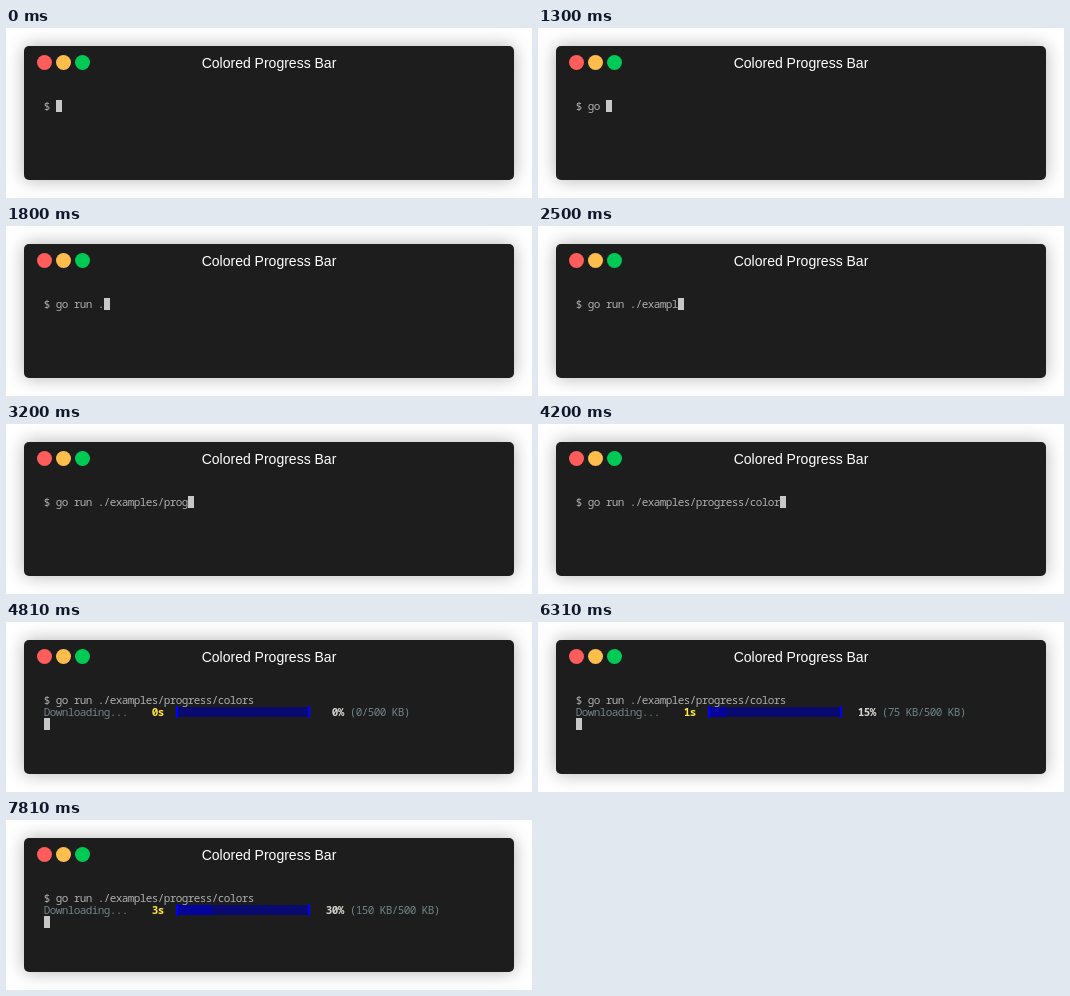
An HTML page for the animation above (8000 ms loop, 526 by 170 pixels).

```html
<!DOCTYPE html>
<html lang="en">
<head>
<meta charset="utf-8">
<title>Colored Progress Bar</title>
<style>
  html, body { margin: 0; width: 526px; height: 170px; overflow: hidden; background: #fff; }
  .window {
    position: absolute; left: 18px; top: 18px; width: 490px; height: 134px;
    border-radius: 5px; background: #1d1d1d; box-shadow: 0 0 18px rgba(0, 0, 0, .3);
  }
  .dot { position: absolute; top: 9px; width: 15px; height: 15px; border-radius: 50%; }
  .title {
    position: absolute; top: 9px; width: 100%; text-align: center; color: #fff;
    font: 14px/16px "Liberation Sans", Arial, sans-serif;
  }
  .screen {
    position: absolute; left: 20px; top: 54px; color: #afafaf;
    font: 11px/12px "Noto Sans Mono", monospace; letter-spacing: -.6px;
  }
  .screen > * { position: absolute; }
  .text { margin-left: -.3px; white-space: pre; }
  .cursor { width: 6px; height: 12px; background: #c7c7c7; }
  .row { top: 12px; }
  .dim { color: #708387; }
  .time { color: #ffe640; font-weight: 700; }
  .percent { color: #d5d5d0; font-weight: 700; }
</style>
</head>
<body>
<div class="window">
  <i class="dot" style="left:13px;background:#ff5c5c"></i>
  <i class="dot" style="left:32px;background:#ffbd4c"></i>
  <i class="dot" style="left:51px;background:#00ca56"></i>
  <div class="title">Colored Progress Bar</div>
  <div class="screen">
    <span class="text" id="command"></span>
    <span class="text row dim output">Downloading...</span>
    <span class="text row time output" id="time" style="left:108px"></span>
    <svg class="row output" style="left:132px" width="134" height="12">
      <defs>
        <pattern id="light" width="6" height="12" patternUnits="userSpaceOnUse">
          <path d="M0 0h6v12H0z" fill="#0b0b62"/>
          <path d="M0 10L6 2" stroke="#0000c0"/>
        </pattern>
        <pattern id="dense" width="3" height="3" patternUnits="userSpaceOnUse">
          <path d="M0 0h3v3H0z" fill="#06068c"/>
          <path d="M0 3L3 0" stroke="#0000c8" stroke-width=".8"/>
        </pattern>
      </defs>
      <rect y="1" width="132" height="10" fill="url(#light)"/>
      <rect y="1" height="10" fill="url(#dense)" id="fill"/>
      <path d="M0 0h2v12H0zM132 0h2v12h-2z" fill="#00f"/>
    </svg>
    <span class="text row percent output" id="percent" style="left:276px"></span>
    <span class="text row dim output" id="size" style="left:306px"></span>
    <i class="cursor" id="cursor"></i>
  </div>
</div>
<script>
  const LOOP = 8000, KEY = 100, CELL = 6, LINE = 12;
  const TYPE_FROM = 1000, ENTER = 4400, OUTPUT = 4810, TICK = 500;
  const BAR_CELLS = 22, TOTAL = 500, CHUNK = 25;
  const COMMAND = "go run ./examples/progress/colors";
  const SKIPPED = [4, 12, 14, 25, 31]; // keys that appear together with the next one

  const el = id => document.getElementById(id);
  const [command, time, fill, percent, size, cursor] =
    ["command", "time", "fill", "percent", "size", "cursor"].map(el);
  const output = document.querySelectorAll(".output");

  function typedAt(t) {
    const n = Math.floor((t - TYPE_FROM) / KEY);
    const shown = SKIPPED.includes(n) ? n - 1 : n;
    return Math.max(0, Math.min(COMMAND.length, shown));
  }

  function showProgress(t) {
    const ticks = Math.max(0, Math.floor((t - OUTPUT) / TICK));
    const done = ticks * CHUNK, part = done / TOTAL;
    time.textContent = Math.floor(ticks * TICK / 1000) + "s";
    percent.textContent = String(Math.round(part * 100)).padStart(3) + "%";
    size.textContent = `(${done ? done + " KB" : 0}/${TOTAL} KB)`;
    fill.setAttribute("width", Math.floor(part * BAR_CELLS) * CELL);
  }

  function render(t) {
    const typed = typedAt(t), entered = t >= ENTER, running = t >= OUTPUT;
    command.textContent = "$ " + COMMAND.slice(0, typed);
    cursor.style.left = (entered ? 0 : (typed + 2) * CELL) + "px";
    cursor.style.top = (entered + running) * LINE + "px";
    for (const part of output) part.style.visibility = running ? "visible" : "hidden";
    showProgress(t);
  }

  const start = performance.now();
  function frame() {
    render((performance.now() - start) % LOOP);
    requestAnimationFrame(frame);
  }
  frame();
</script>
</body>
</html>
```
